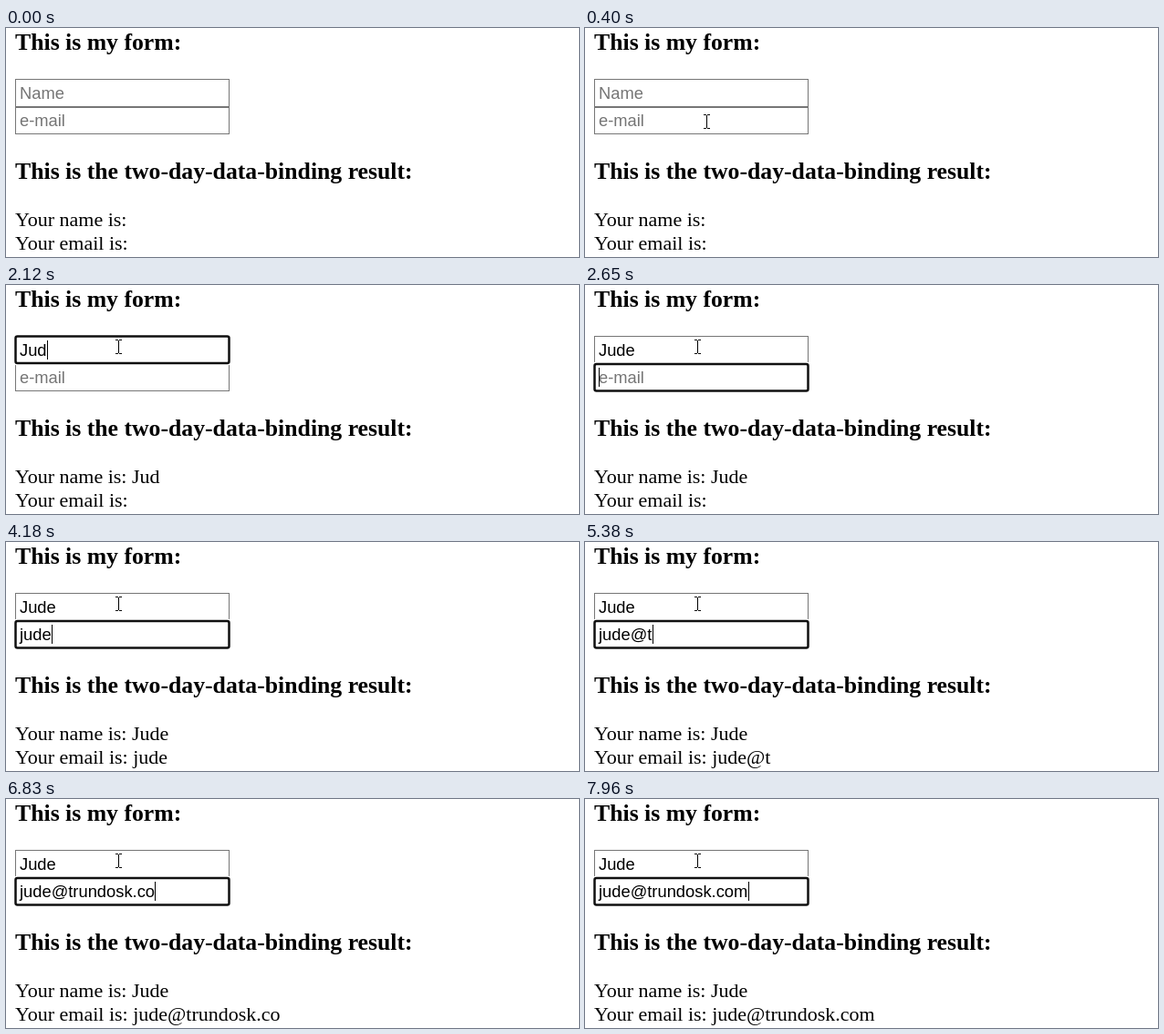
Animation of 628x252 px, one loop 8000 ms. Source, as an HTML page:

```html
<!DOCTYPE html>
<html lang="en">
<head>
<meta charset="utf-8">
<title>Two-way data binding form</title>
<style>
  html, body { margin: 0; width: 100%; height: 100%; overflow: hidden; background: #fff; }
  svg { display: block; width: 628px; height: 252px; }
  text { font: 22px "Liberation Serif", "Times New Roman", serif; }
  .heading { font-size: 25.74px; font-weight: bold; }
  .value { font: 18.33px "Liberation Sans", Arial, sans-serif; }
  .field { fill: #fff; stroke: #767676; }
  .halo { fill: none; stroke: #fff; stroke-width: 5; }
  .ring { fill: none; stroke: #101010; stroke-width: 2.5; }
</style>
</head>
<body>
<svg viewBox="0 0 628 252">
  <text class="heading" x="10" y="24">This is my form:</text>
  <rect class="field" x="10.5" y="56.5" width="234" height="30"/>
  <rect class="field" x="10.5" y="87.5" width="234" height="29"/>
  <g id="focus">
    <rect class="halo" x="10.5" y="56.5" width="234" height="29.5" rx="2"/>
    <rect class="ring" x="10.5" y="56.5" width="234" height="29.5" rx="2"/>
  </g>
  <text class="value" id="nameValue" x="15" y="78"></text>
  <text class="value" id="emailValue" x="15" y="108"></text>
  <rect id="caret" width="1" height="21"/>
  <text class="heading" x="10" y="166">This is the two-day-data-binding result:</text>
  <text id="nameResult" x="10" y="218"></text>
  <text id="emailResult" x="10" y="244"></text>
  <path id="beam" fill="none" stroke="#000"
    d="M-3 -7.5h3M1 -7.5h3M.5 -7V7M-3 7.5h3M1 7.5h3"/>
  <path id="arrow" fill="#fff" stroke="#000"
    d="M.5 .5V16.5L4.2 13L6.7 18.5L9 17.5L6.6 12.2H11.7Z"/>
</svg>
<script>
const LOOP = 8000, BLINK = 530, FOCUS_NAME = 730, FOCUS_EMAIL = 2650;
const NAME = 'Jude', EMAIL = 'jude@trundosk.com';

// [time, characters typed so far]
const nameKeys = [[1860, 1], [1920, 2], [2120, 3], [2320, 4]];
const emailKeys = [
  [3980, 1], [4110, 3], [4180, 4], [4980, 5], [5380, 6], [5510, 7], [5710, 8],
  [5840, 9], [6040, 10], [6180, 11], [6310, 13], [6510, 14], [6830, 16], [6900, 17]
];
// [time, x, y, cursor shape]
const pointer = [
  [130, 301, 201, 'arrow'], [200, 262, 182, 'arrow'], [270, 212, 155, 'beam'],
  [330, 160, 122, 'arrow'], [400, 133, 103, 'beam'], [470, 127, 82, 'beam'],
  [530, 124, 63, 'beam'], [600, 123, 60, 'beam'], [730, 123, 66, 'beam'],
  [860, 123, 68, 'beam']
];

const el = id => document.getElementById(id);
const latest = (steps, t) => steps.filter(step => step[0] <= t).pop();
const show = (node, on) => node.setAttribute('visibility', on ? 'visible' : 'hidden');
const move = (node, x, y) => node.setAttribute('transform', `translate(${x} ${y})`);

function fillField(key, placeholder, typed) {
  const value = el(key + 'Value');
  value.textContent = typed || placeholder;
  value.setAttribute('fill', typed ? '#000' : '#757575');
  el(key + 'Result').textContent = `Your ${key} is: ${typed}`;
  return typed ? value.getComputedTextLength() : 0;
}

function render(t) {
  const nameKey = latest(nameKeys, t), emailKey = latest(emailKeys, t);
  const nameWidth = fillField('name', 'Name', NAME.slice(0, nameKey ? nameKey[1] : 0));
  const emailWidth = fillField('email', 'e-mail', EMAIL.slice(0, emailKey ? emailKey[1] : 0));

  const focused = t >= FOCUS_NAME, inEmail = t >= FOCUS_EMAIL;
  show(el('focus'), focused);
  move(el('focus'), 0, inEmail ? 30.5 : 0);

  // Every keystroke restarts the caret's blink.
  const key = inEmail ? emailKey : nameKey;
  const since = t - (key ? key[0] : inEmail ? FOCUS_EMAIL : FOCUS_NAME);
  show(el('caret'), focused && Math.floor(since / BLINK) % 2 === 0);
  move(el('caret'), Math.floor(15.9 + (inEmail ? emailWidth : nameWidth)), inEmail ? 91 : 61);

  const spot = latest(pointer, t);
  for (const shape of ['arrow', 'beam']) {
    show(el(shape), spot && spot[3] === shape);
    if (spot) move(el(shape), spot[1], spot[2]);
  }
}

const start = performance.now();
function tick() {
  render((performance.now() - start) % LOOP);
  requestAnimationFrame(tick);
}
tick();
</script>
</body>
</html>
```
